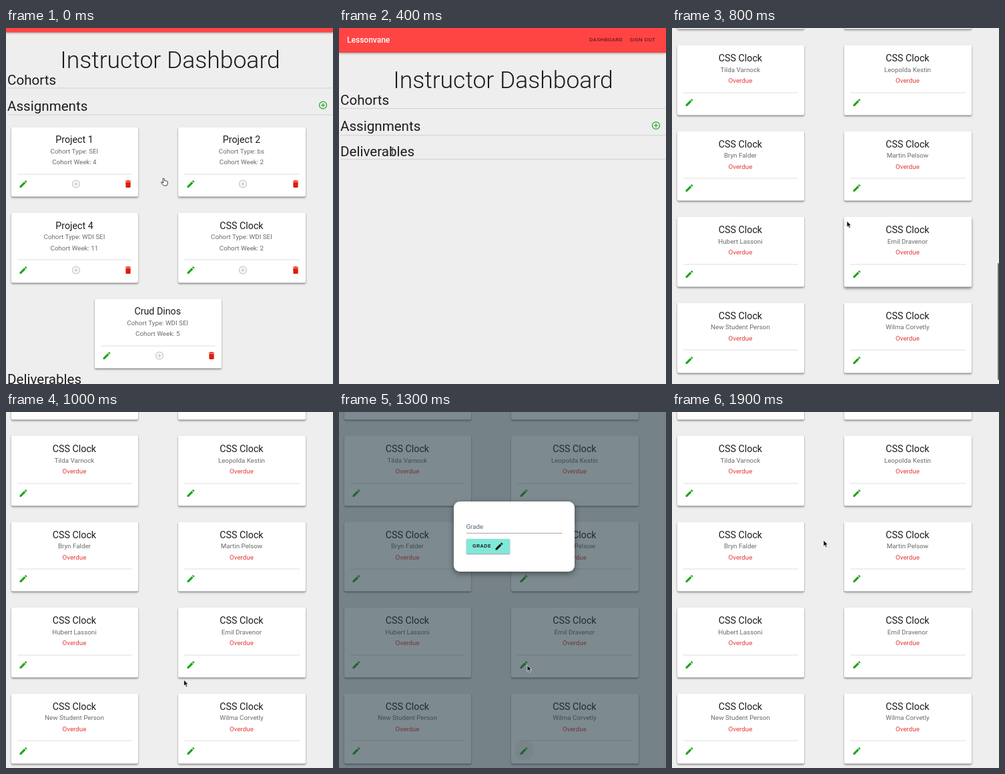
Animation of 490x533 px, one loop 2 s. Source, as an HTML page:

```html
<!DOCTYPE html>
<html lang="en">
<head>
<meta charset="utf-8">
<title>Instructor Dashboard</title>
<style>
html, body { margin: 0; width: 100%; height: 100%; overflow: hidden; }
body { position: relative; background: #eee; color: #1c1c1c; font-family: Roboto, sans-serif; }
body *, .card::after { position: absolute; box-sizing: border-box; margin: 0; }
#stage { left: 0; top: 0; width: 490px; height: 533px; overflow: hidden; background: #eee; }
#page { left: 0; top: 0; width: 490px; }
#page > header { width: 490px; height: 37px; background: #ff4444; box-shadow: 0 1px 3px rgba(0,0,0,.35); }
.t { line-height: 0; white-space: nowrap; font-weight: 400; }
.nav { top: 18px; font-size: 8px; letter-spacing: .4px; color: rgba(0,0,0,.72); }
h1.t { left: 1px; width: 490px; top: 78px; text-align: center; font-size: 35.5px; font-weight: 300; }
h2.t { left: 2px; font-size: 20.6px; }
.rule { left: 2px; width: 487px; height: 1px; background: #d2d2d2; }
.list { left: 0; width: 490px; overflow: hidden; }
.card { width: 190.5px; height: 104.5px; border-radius: 2px; background: #fff; text-align: center;
  box-shadow: 0 1px 2px rgba(0,0,0,.32), 0 2px 3px rgba(0,0,0,.24); }
.card.hover { box-shadow: 0 2px 3px rgba(0,0,0,.32), 0 3px 5px rgba(0,0,0,.24); }
.card .t { left: 0; width: 189.5px; font-size: 9.8px; color: #6b6b6b; }
.card h3.t { top: 18.8px; font-size: 14.25px; color: #1c1c1c; }
.card .late { color: #e53935; }
.card::after { content: ""; left: 9px; right: 9px; top: 70.2px; height: 1px; background: #dedede; }
svg.icon { width: 14.6px; height: 14.6px; transform: translate(-50%, -50%); }
#halo { left: 4.5px; top: 71px; width: 29px; height: 29px; border-radius: 50%; background: #e3e3e3; }
#thumb { left: 488px; width: 2px; height: 175px; background: #6e6e6e; border-radius: 1px; }
#overlay { inset: 0; background: rgba(32,54,65,.58); }
#modal { left: 172px; top: 134px; width: 181px; height: 105px; border-radius: 9px; background: #fff;
  box-shadow: 0 3px 8px rgba(0,0,0,.45); }
#label, #value { left: 18.5px; top: 38px; font-size: 9.7px; color: #546474; }
#value { color: #222; }
#line { left: 19px; top: 47px; width: 143px; height: 1px; background: #a5a5a5; }
#spin { left: 154.5px; top: 33px; }
#button { left: 19px; top: 56px; width: 65px; height: 21.5px; border-radius: 1px; background: #80e8d8;
  box-shadow: 0 1px 2px rgba(0,0,0,.45); }
#button .t { left: 9px; top: 11.3px; font-size: 8px; font-weight: 500; letter-spacing: .5px; color: #111; }
.focus #label { top: 23.8px; font-size: 7px; color: #b3262a; }
.focus #line { top: 46px; background: #a8383c; }
.press #button { background: #70cbbd; }
#cursor { left: 0; top: 0; overflow: visible; width: 14px; height: 16px; }
</style>
</head>
<body>
<div id="stage">
  <div id="page">
    <header>
      <div class="t" style="left:12px;top:18px;font-size:12px;font-weight:500;color:#fff">Lessonvane</div>
      <div class="t nav" style="left:375px">DASHBOARD</div>
      <div class="t nav" style="left:435.5px">SIGN OUT</div>
    </header>
    <h1 class="t">Instructor Dashboard</h1>
    <h2 class="t" style="top:108px">Cohorts</h2>
    <div class="rule" style="top:119.5px"></div>
    <h2 class="t" style="top:146.7px">Assignments</h2>
    <div class="rule" style="top:160px"></div>
    <div class="list" id="assignments" style="top:161px"></div>
    <div id="lower" style="top:0;left:0">
      <h2 class="t" style="top:185px">Deliverables</h2>
      <div class="rule" style="top:196px"></div>
      <div class="list" id="deliverables" style="top:197px"></div>
    </div>
  </div>
  <div id="thumb"></div>
  <div id="overlay">
    <div id="modal">
      <div class="t" id="label">Grade</div>
      <div class="t" id="value">3</div>
      <svg id="spin" width="6" height="10" fill="none" stroke="#bbb" stroke-width=".7">
        <rect x=".5" y=".5" width="5" height="9" rx="2"/><path d="M2 4l1-1.4L4 4M2 6l1 1.4L4 6"/>
      </svg>
      <div id="line"></div>
      <div id="button"><div class="t">GRADE</div></div>
    </div>
  </div>
  <svg id="cursor" stroke-linejoin="round">
    <path id="arrow" d="M0 0v9.2l2.1-1.9 1.5 3.4 1.7-.7-1.5-3.3h2.9z" fill="#111" stroke="#fff" stroke-width=".7"/>
    <path id="hand" d="M-1 .6Q0-.8 1 .6L2 4Q3 3 3.6 4.2Q4.6 3.4 5 4.6Q6.2 4.2 6.3 5.6L6 8.6 4.8 11H.4L-3.2 7Q-4 5.4-2.3 5.5L-.3 7z"
      fill="#fff" stroke="#222" stroke-width=".9"/>
    <path id="beam" d="M-1.5-5Q0-5 0-4Q0-5 1.5-5M0-4V4M-1.5 5Q0 5 0 4Q0 5 1.5 5M-1 2H1" fill="none" stroke="#333" stroke-width=".9"/>
  </svg>
</div>
<script>
const $ = id => document.getElementById(id);
const LOOP = 2000, STEP = 100, ROW = 128.55, END = 1078.5;
const GREEN = '#1aa81a', RED = '#e01b0b', GRAY = '#c4c4c4';

const glyphs = {
  edit: 'M3 17.25V21h3.75L17.81 9.94l-3.75-3.75zM20.71 7.04a1 1 0 000-1.41l-2.34-2.34a1 1 0 00-1.41 0l-1.83 1.83 3.75 3.75z',
  bin: 'M6 19c0 1.1.9 2 2 2h8c1.1 0 2-.9 2-2V7H6zM19 4h-3.5l-1-1h-5l-1 1H5v2h14z',
  add: 'M13 7h-2v4H7v2h4v4h2v-4h4v-2h-4zM12 2a10 10 0 100 20 10 10 0 000-20zm0 18a8 8 0 110-16 8 8 0 010 16z'
};
const icon = (name, x, y, color) =>
  `<svg class="icon" viewBox="0 0 24 24" style="left:${x}px;top:${y}px"><path fill="${color}" d="${glyphs[name]}"/></svg>`;

function card(i, count, title, lines, extras, late) {
  const alone = i === count - 1 && i % 2 === 0;
  const x = alone ? 132.5 : i % 2 ? 258.2 : 7.7;
  const y = 17.5 + ROW * Math.floor(i / 2);
  return `<div class="card" style="left:${x}px;top:${y}px"><h3 class="t">${title}</h3>
    <div class="t" style="top:36.3px">${lines[0]}</div>
    <div class="t ${late ? 'late' : ''}" style="top:52.8px">${lines[1]}</div>
    ${icon('edit', 18.5, 85.5, GREEN)}${extras}</div>`;
}

const assignments = [
  ['Project 1', 'SEI', 4], ['Project 2', 'bs', 2], ['Project 4', 'WDI SEI', 11],
  ['CSS Clock', 'WDI SEI', 2], ['Crud Dinos', 'WDI SEI', 5]
];
const students = ['Tilda Varnock', 'Leopolda Kestin', 'Bryn Falder', 'Martin Pelsow',
  'Hubert Lassoni', 'Emil Dravenor', 'New Student Person', 'Wilma Corvetly'];
const tools = icon('add', 97.3, 85.5, GRAY) + icon('bin', 175.5, 85.5, RED);

$('assignments').innerHTML = assignments.map(([title, type, week], i) =>
  card(i, assignments.length, title, ['Cohort Type: ' + type, 'Cohort Week: ' + week], tools)).join('');
$('deliverables').innerHTML = Array.from({ length: 22 }, (_, i) => {
  const title = i < 6 ? 'Project 1' : i < 14 ? 'Project 4' : 'CSS Clock';
  return card(i, 22, title, [students[(i + 2) % 8], 'Overdue'], '', true);
}).join('');
$('page').insertAdjacentHTML('beforeend', icon('add', 474.7, 146.3, GREEN));
$('button').insertAdjacentHTML('beforeend', icon('edit', 48.5, 10.8, '#111'));

const cards = [...document.querySelectorAll('.card')];
cards[cards.length - 1].insertAdjacentHTML('afterbegin', '<div id="halo"></div>');

// Tracks hold [step, value] pairs, linear in between.
const tracks = {
  x: [[0, 236], [2, 140], [4, 80], [6, 80], [8, 262], [12, 271], [13, 282], [15, 235], [16, 235], [18, 227]],
  y: [[0, 225], [2, 118], [4, 184], [6, 184], [8, 289], [12, 513], [13, 379], [15, 172], [16, 172], [18, 192]],
  scroll: [[1, 30.5], [2, 0], [6, 0], [7, 560], [8, END + 10], [10, END]],
  upper: [[1, 1], [2, .45], [3, 0]],
  lower: [[4, 0], [5, .35], [6, 1]],
  halo: [[11, 0], [12, 1], [13, .4], [14, 0]]
};
function at(name, s) {
  const keys = tracks[name], n = keys.findIndex(k => k[0] >= s);
  if (n < 0) return keys[keys.length - 1][1];
  if (n === 0) return keys[0][1];
  const [a, va] = keys[n - 1], [b, vb] = keys[n];
  return va + (vb - va) * (s - a) / (b - a);
}
const pointers = [[0, 'hand'], [4, 'beam'], [7, 'arrow'], [12, 'hand'], [13, 'arrow'], [15, 'beam'], [17, 'hand'], [19, 'arrow']];
const show = (id, on) => { $(id).style.display = on ? '' : 'none'; };

function draw(s) {
  const x = at('x', s), y = at('y', s), scroll = at('scroll', s), upper = at('upper', s);
  const open = s >= 13 && s < 19;
  $('page').style.transform = `translateY(${-scroll}px)`;
  $('assignments').style.height = 385 * upper + 'px';
  $('lower').style.transform = `translateY(${371 * upper}px)`;
  $('deliverables').style.height = (11 * ROW + 18) * at('lower', s) + 'px';
  $('halo').style.opacity = at('halo', s);

  show('thumb', s >= 7 && s < 10);
  $('thumb').style.top = 352 * Math.min(1, scroll / END) + 'px';

  show('overlay', open);
  $('modal').className = (s >= 15 ? 'focus ' : '') + (s >= 17 ? 'press' : '');
  show('value', s >= 16);
  show('spin', s >= 15);

  const pointer = pointers.filter(p => p[0] <= s).pop()[1];
  for (const id of ['arrow', 'hand', 'beam']) show(id, id === pointer);
  $('cursor').style.transform = `translate(${x}px, ${y}px)`;

  for (const c of cards) {
    const r = c.getBoundingClientRect();
    c.classList.toggle('hover', !open && x > r.left && x < r.right && y > r.top && y < r.bottom);
  }
}

const start = performance.now();
let last = -1;
function tick() {
  const s = Math.floor((performance.now() - start) % LOOP / STEP);
  if (s !== last) draw(last = s);
  requestAnimationFrame(tick);
}
tick();
</script>
</body>
</html>
```
